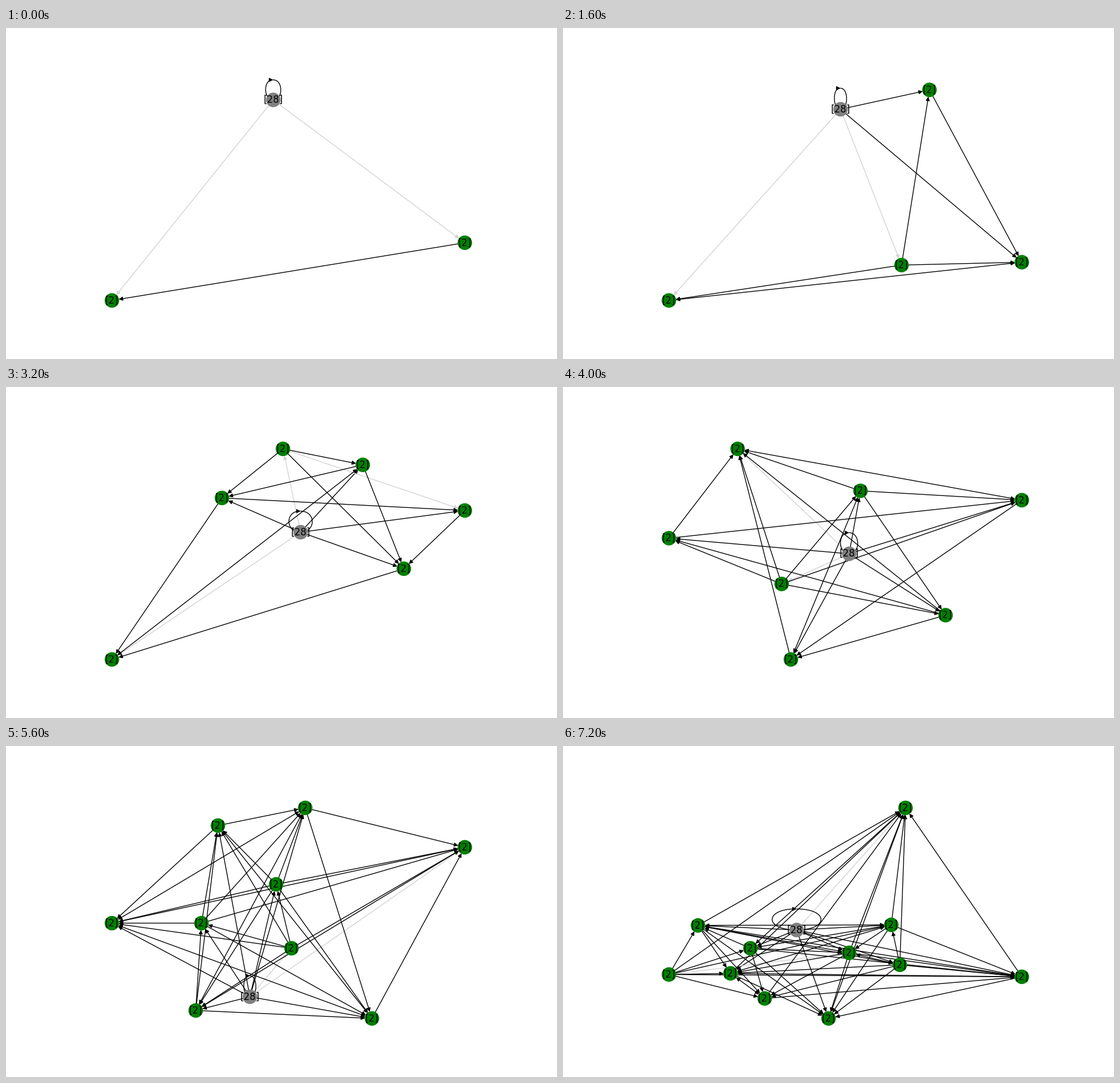
A matplotlib script for the animation above (8 s loop, 966 by 580 pixels).

```python
from itertools import combinations
from math import cos, sin, sqrt

import matplotlib.pyplot as plt
import numpy as np
from matplotlib.animation import FuncAnimation
from matplotlib.patches import FancyArrowPatch
from matplotlib.path import Path

W, H, DPI = 966, 580, 100
LEFT, RIGHT, TOP, BOTTOM = 185.7, 804.4, 108.4, 477.4
HUB_TOP = 126
NODE_SIZE = 300
SHRINK = sqrt(NODE_SIZE) / 2
NAMES = "ZABCDEFGHIJK"

scenes = []


def fit(points):
    """Stretch a layout to the stage box; a hub on top leaves room for its loop."""
    pts = np.array(points, float)
    low, high = pts.min(axis=0), pts.max(axis=0)
    top = HUB_TOP if pts[0, 1] == low[1] else TOP
    start = np.array([LEFT, top])
    return start + (pts - low) / (high - low) * ([RIGHT, BOTTOM] - start)


def spiral(n):
    return [(sqrt(i) * cos(2.4 * i), sqrt(i) * sin(2.4 * i)) for i in range(n)]


def scene(points, soft, skip="", both="", loop=20):
    """The hub Z comes first, then A, B, C... Each node points at all later
    ones, except for the skipped pairs; soft pairs are light, both is two-way."""
    scenes.append((fit(points), soft.split(), skip.split(), both.split(), loop))


scene([(468, 126), (804, 376), (185, 477)], "ZA ZB", loop=17.6)

scene([(476, 126), (640, 300), (804, 396), (185, 477)],
      "ZA ZC", both="BC", loop=16)

scene([(486, 142), (593, 415), (642, 108), (804, 410), (185, 477)],
      "ZA ZD", "BD", "CD", loop=14.2)

scene(spiral(6), "ZA ZE", "BD", "CE")

scene([(516, 254), (485, 108), (625, 136), (378, 194), (804, 216),
       (697, 318), (185, 477)],
      "ZA ZF AD", "AF BD CE DF", "BF", loop=27.2)

scene(spiral(8), "ZA ZG", "AF BD CE DF", "BF EG")

scene([(403, 372), (311, 292), (434, 272), (306, 439), (431, 477),
       (413, 108), (560, 251), (185, 308), (804, 389)],
      "ZA ZH", "BD CH EF EH FH", "CF FG GH", loop=18.3)

scene([(427, 439), (500, 354), (473, 242), (332, 463), (342, 310),
       (371, 139), (524, 108), (641, 477), (185, 310), (804, 177)],
      "ZA ZI", "AF AG BD CH EI", "CF CI EG FH GH HI", loop=14)

scene([(683, 186), (396, 209), (715, 236), (533, 167), (238, 224),
       (467, 133), (470, 286), (185, 108), (804, 122), (560, 236),
       (449, 477)],
      "ZJ", "ZA BD CI DG DH EI FJ IJ", "DE FG FI GH GI HJ", loop=66.2)

scene([(409, 322), (185, 400), (590, 383), (575, 313), (328, 354),
       (501, 362), (236, 314), (293, 398), (353, 442), (804, 404),
       (465, 477), (600, 108)],
      "ZK AE", "ZA ZH AB AJ BD CH DG HJ", "BE BF CF CG DK EF GH GI JK",
      loop=57)

fig = plt.figure(figsize=(W / DPI, H / DPI), dpi=DPI, facecolor="white")
ax = fig.add_axes([0, 0, 1, 1])


def arrow(color="black", style="-|>", **shape):
    ax.add_patch(FancyArrowPatch(arrowstyle=style, mutation_scale=10,
                                 linewidth=1, color=color, zorder=1, **shape))


def draw_edges(pts, soft, skip, both):
    for i, j in combinations(range(len(pts)), 2):
        pair = NAMES[i] + NAMES[j]
        if pair not in skip:
            arrow("lightgray" if pair in soft else "black",
                  "<|-|>" if pair in both else "-|>",
                  posA=pts[i], posB=pts[j], shrinkA=SHRINK, shrinkB=SHRINK)


def draw_loop(pts, half):
    """Self loop on the hub that starts and ends at its top."""
    x, y = pts[0]
    top = y - 0.1 * np.ptp(pts[:, 1])
    verts = [(x, top), (x + half, top), (x + half, y), (x, y),
             (x - half, y), (x - half, top), (x, top)]
    arrow(path=Path(verts, [Path.MOVETO] + [Path.CURVE4] * 6))


def draw(i):
    pts, soft, skip, both, loop = scenes[i]
    ax.clear()
    ax.set(xlim=(0, W), ylim=(H, 0))
    ax.axis("off")
    draw_edges(pts, soft, skip, both)
    draw_loop(pts, loop)
    others = len(pts) - 1
    ax.scatter(pts[:, 0], pts[:, 1], s=NODE_SIZE, linewidths=1, zorder=2,
               c=["gray"] + ["green"] * others)
    for (x, y), label in zip(pts, ["[28]"] + ["[2]"] * others):
        ax.text(x, y, label, fontsize=12, family="DejaVu Sans",
                ha="center", va="center", zorder=3)
    return []


anim = FuncAnimation(fig, draw, frames=len(scenes), interval=800,
                     repeat=True, repeat_delay=0)
plt.show()
```
